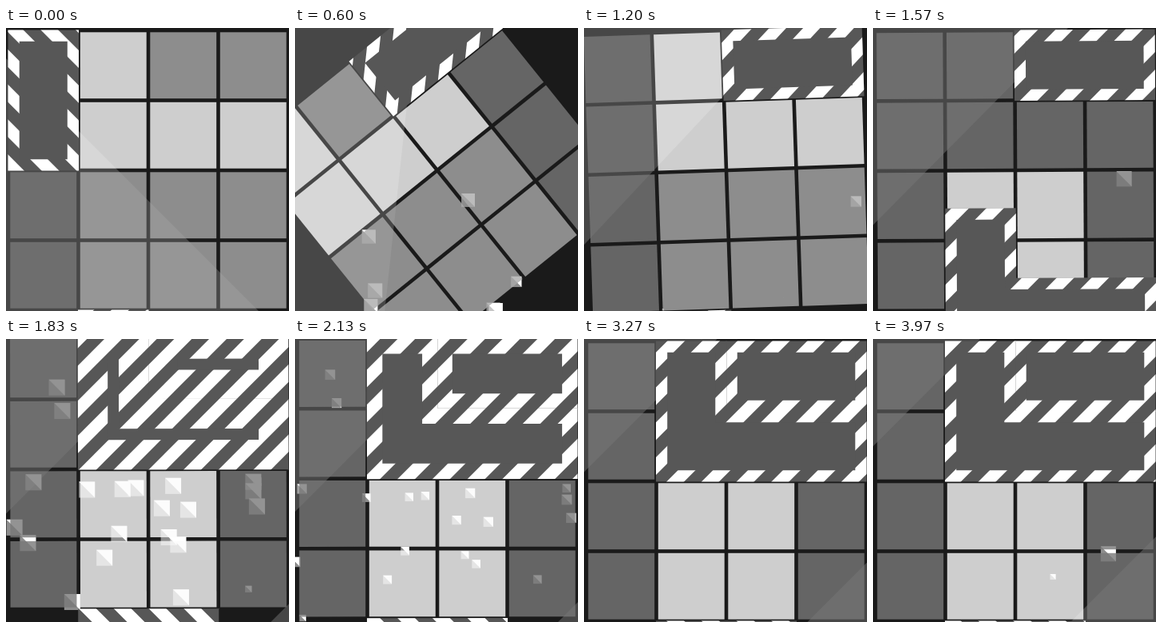
Recreate the animation shown at these times as an HTML page with a canvas. Size 354 by 354 pixels, loop 4010 ms.

```html
<!DOCTYPE html>
<html lang="en">
<head>
<meta charset="utf-8">
<title>Block board</title>
<style>
  html, body { margin: 0; width: 100%; height: 100%; overflow: hidden; background: #1a1a1a; }
  canvas { display: block; width: 354px; height: 354px; }
</style>
</head>
<body>
<canvas id="stage" width="354" height="354"></canvas>
<script>
const ctx = document.getElementById('stage').getContext('2d');
const LOOP = 4010, SIZE = 354, MID = 178, CELL = 87.5, HALF = 2 * CELL, GAP = 2.3;
const TURN = 434, SHIFT = 740, LAUNCH = 1400, LAND = 1760;
const LIGHT = 'rgba(252,252,252,.8)', MEDIUM = 'rgba(171,171,171,.8)', DARK = 'rgba(121,121,121,.8)';
const BODY = '#575757';

// Clockwise outlines in cell units
const BAR = [[2, 0], [4, 0], [4, 1], [2, 1]];
const HOOK = [[1, 0], [2, 0], [2, 1], [4, 1], [4, 2], [1, 2]];
const SQUARE = [[1, 4], [3, 4], [3, 6], [1, 6]];

function random(seed) {
  const v = Math.sin(seed * 127.1 + 3.7) * 43758.5453;
  return v - Math.floor(v);
}

function trace(points) {
  ctx.beginPath();
  points.forEach(([x, y]) => ctx.lineTo(x, y));
  ctx.closePath();
}

function inset(points, d) {
  const n = points.length;
  const normal = (a, b) => [-Math.sign(b[1] - a[1]), Math.sign(b[0] - a[0])];
  return points.map((p, i) => {
    const u = normal(points[(i + n - 1) % n], p), v = normal(p, points[(i + 1) % n]);
    return [p[0] + d * (u[0] + v[0]), p[1] + d * (u[1] + v[1])];
  });
}

// The stripes scroll by one period every two seconds
function drawStripes(t, lean) {
  const period = CELL / 2, reach = 480;
  const scroll = -2 - period * ((t - 3970) / 2000 % 1);
  ctx.fillStyle = '#fff';
  for (let i = -22; i <= 22; i++) {
    const a = i * period + scroll, b = a + period / 2, d = lean * reach;
    trace([[a - d, reach], [b - d, reach], [b + d, -reach], [a + d, -reach]]);
    ctx.fill();
  }
}

function drawPiece(cells, t, border, dx = 0, dy = 0, lean = 1) {
  const outline = cells.map(([x, y]) => [x * CELL - HALF, y * CELL - HALF]);
  ctx.save();
  ctx.translate(dx * CELL, dy);
  trace(inset(outline, -0.5));
  ctx.fillStyle = BODY;
  ctx.fill();
  ctx.save();
  ctx.clip();
  drawStripes(t, lean);
  ctx.restore();
  if (border < CELL / 2) {
    trace(inset(outline, border));
    ctx.fillStyle = BODY;
    ctx.fill();
  }
  ctx.restore();
}

function inPlace(angle, lift, draw) {
  ctx.save();
  ctx.translate(MID, MID + lift);
  ctx.rotate(angle * Math.PI / 180);
  draw();
  ctx.restore();
}

// Diagonal light bands drifting across the backdrop
function drawSheen(t) {
  const edge = (318 - 0.0463 * t - 2 * MID) / Math.SQRT2, band = 467 / Math.SQRT2;
  ctx.rotate(Math.PI / 4);
  ctx.fillStyle = '#474747';
  ctx.fillRect(edge - band, -600, band, 1200);
  ctx.fillRect(edge + band, -600, band, 1200);
}

function drawSpark(x, y, s) {
  if (s <= 0) return;
  ctx.fillStyle = 'rgba(255,255,255,.5)';
  ctx.fillRect(x - s / 2, y - s / 2, s, s);
  ctx.fillStyle = '#fff';
  trace([[x - s / 2, y - s / 2], [x + s / 2, y - s / 2], [x + s / 2, y + s / 2]]);
  ctx.fill();
}

function drawBurst(age, count, cx, cy, radius, seed) {
  if (age < 0 || age > 0.8) return;
  const spread = 1 - Math.exp(-25 * age);
  for (let i = seed; i < seed + count; i++) {
    const turn = random(i) * 2 * Math.PI;
    const reach = radius * Math.pow(random(i + 50), 0.7) * spread;
    const size = 20 * Math.min(1, 1.12 - age * (1.3 + random(i + 90) * 0.4));
    drawSpark(cx + Math.cos(turn) * reach, cy + Math.sin(turn) * reach + 40 * age, size);
  }
}

// Single sparks that rise and shrink now and then
function drawStrays(t) {
  const every = 300, life = 450;
  for (let i = 0; i * every < LOOP; i++) {
    const age = (t - i * every) / life;
    if (age < 0 || age > 1) continue;
    const x = random(i + 300) * SIZE, y = SIZE * Math.sqrt(random(i + 400));
    drawSpark(x, y - 18 * age, 20 * Math.min(1, age * 6, 2 - 2 * age));
  }
}

function tileColor(row, col, t, start) {
  if (t >= LAUNCH) return row > 1 && (col === 1 || col === 2) ? LIGHT : DARK;
  const c = col - start;
  if (c < 0 || c > 2) return DARK;
  return row === 1 || (row === 0 && c === 0) ? LIGHT : MEDIUM;
}

function drawTiles(t, start) {
  const side = CELL - 2 * GAP;
  for (let row = 0; row < 4; row++) {
    for (let col = 0; col < 4; col++) {
      ctx.fillStyle = tileColor(row, col, t, start);
      ctx.fillRect(col * CELL - HALF + GAP, row * CELL - HALF + GAP, side, side);
    }
  }
}

function draw(t) {
  const turned = t >= TURN, landed = t >= LAND;
  const angle = turned ? -90 * Math.exp(-0.00503 * (t - TURN)) : 0;
  const boardAngle = turned ? angle : -90;
  const hit = landed ? Math.exp(-0.005 * (t - LAND)) : 0;
  const lift = -21.5 * hit, border = 13.7 + 33 * hit;
  const start = turned && t < SHIFT ? 0 : 1;
  const rise = Math.min(1, Math.max(0, (t - LAUNCH) / (LAND - LAUNCH)));

  ctx.fillStyle = '#1a1a1a';
  ctx.fillRect(0, 0, SIZE, SIZE);
  inPlace(boardAngle, lift, () => drawSheen(t));
  drawStrays(t);
  drawBurst((t - TURN) / 1000, 6, 180, 340, 150, 1);
  drawBurst((t - LAND) / 1000, 28, 160, 195, 220, 10);
  inPlace(angle, lift, () => drawTiles(t, start));
  inPlace(boardAngle, lift, () => drawPiece(BAR, t, border));
  inPlace(angle, lift, () => {
    drawPiece(HOOK, t, border, start - 1, 4 * CELL * (1 - Math.pow(rise, 1.36)));
    if (landed) drawPiece(SQUARE, t, border, 0, 0, -1);
  });
}

const origin = performance.now();
function frame() {
  draw((performance.now() - origin) % LOOP);
  requestAnimationFrame(frame);
}
frame();
</script>
</body>
</html>
```
